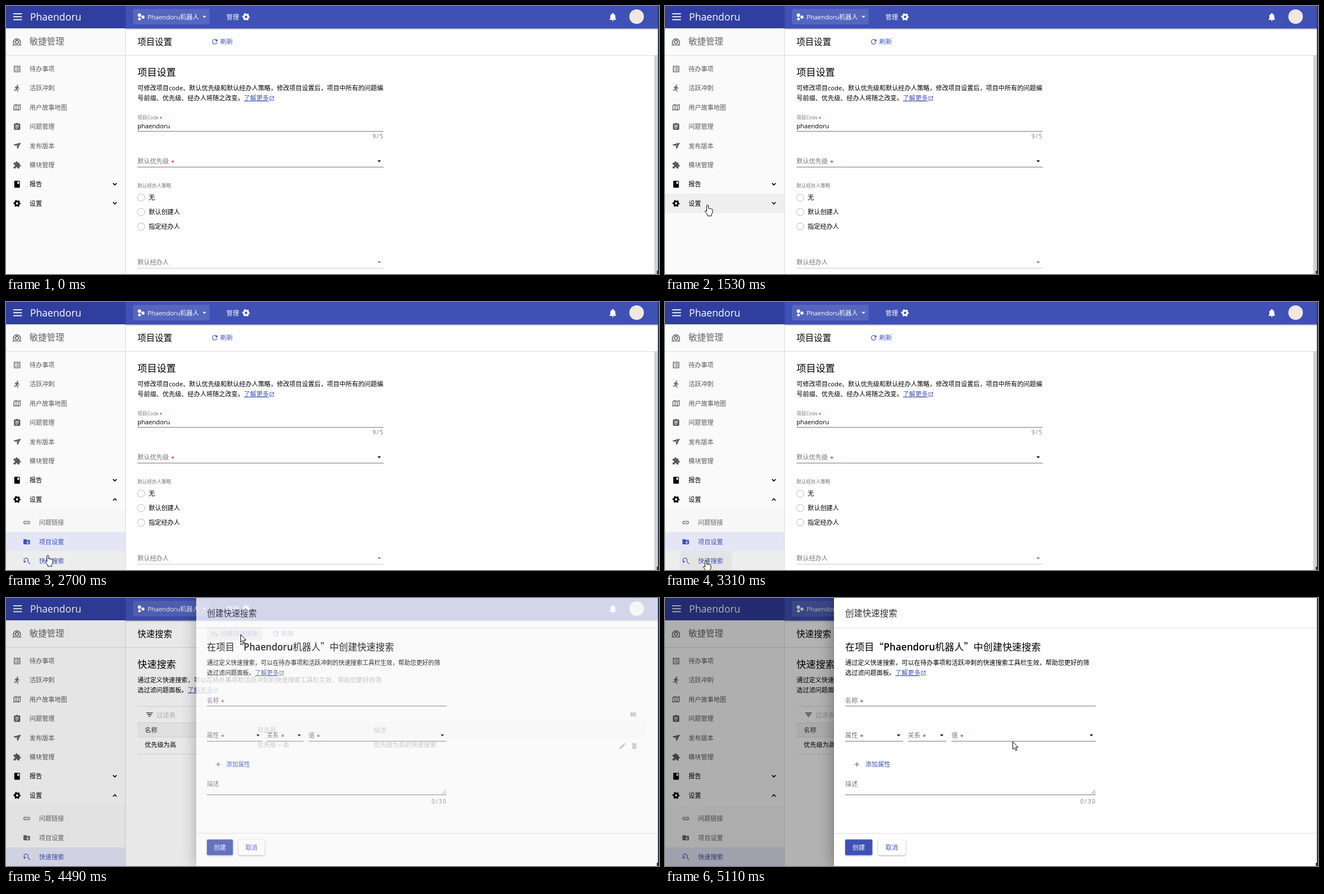
Write an HTML page that moves like this. It is 1167 by 480 pixels and loops after 5180 ms.

```html
<!DOCTYPE html>
<html lang="zh-CN">
<head>
<meta charset="utf-8">
<title>快速搜索</title>
<style>
html, body { margin: 0; width: 100%; height: 100%; overflow: hidden; background: #fff; }
svg { display: block; }
text { font-family: 'Open Sans', 'Noto Sans', 'Noto Sans CJK SC', 'Noto Sans CJK', sans-serif; white-space: pre; }
.cjk { font-family: 'Noto Sans CJK SC', 'Noto Sans CJK', sans-serif; }
.sub { color: #666; }
#drawer { transform-origin: 1165px 0; }
#panel { filter: drop-shadow(-4px 0 12px rgba(0,0,0,.3)); }
.button { filter: drop-shadow(0 1px 1.5px rgba(0,0,0,.35)); }
#ripple { transform-origin: 73px 17px; }
</style>
</head>
<body>
<svg id="stage" width="1167" height="480" viewBox="0 0 1167 480"></svg>
<script>
const LOOP = 5180;
const NAME = 'Phaendoru';
const BLUE = '#3f51b5', GREY = '#757575', RED = '#b71c1c', LINE = '#e0e0e0';

// Icons live on a 24 x 24 grid, either filled or stroked.
const FILLED = {
  run: 'M13.5 5.5a2 2 0 1 0 0-4 2 2 0 0 0 0 4zM9.9 19.4l1-4.4 2.1 2v6h2v-7.5l-2.1-2 .6-3c1.3 1.5 3.3 2.5 5.5 2.5v-2c-1.9 0-3.5-1-4.3-2.4l-1-1.6c-.6-.9-1.4-1.2-2.5-.9L6 8.3V13h2V9.6l1.8-.7-1.6 8.1-4.9-1-.4 2z',
  task: 'M19 3h-4.2a3 3 0 0 0-5.6 0H5a2 2 0 0 0-2 2v14a2 2 0 0 0 2 2h14a2 2 0 0 0 2-2V5a2 2 0 0 0-2-2zM14 17H7v-2h7zM17 13H7v-2h10zM17 9H7V7h10z',
  send: 'M1 8.5L23 3 13.5 22 11 13.5 17 8 8.5 12z',
  puzzle: 'M20.5 11H19V7a2 2 0 0 0-2-2h-4V3.5a2.5 2.5 0 0 0-5 0V5H4a2 2 0 0 0-2 2v3.8h1.5a2.7 2.7 0 0 1 0 5.4H2V20a2 2 0 0 0 2 2h3.8v-1.5a2.7 2.7 0 0 1 5.4 0V22H17a2 2 0 0 0 2-2v-4h1.5a2.5 2.5 0 0 0 0-5z',
  book: 'M18 2H6a2 2 0 0 0-2 2v16a2 2 0 0 0 2 2h12a2 2 0 0 0 2-2V4a2 2 0 0 0-2-2zM13 4h5v8l-2.5-1.5L13 12z',
  link: 'M3.9 12A3.1 3.1 0 0 1 7 8.9h4V7H7a5 5 0 0 0 0 10h4v-1.9H7A3.1 3.1 0 0 1 3.9 12zM8 13h8v-2H8zM17 7h-4v1.9h4a3.1 3.1 0 0 1 0 6.2h-4V17h4a5 5 0 0 0 0-10z',
  folder: 'M20 6h-8l-2-2H4a2 2 0 0 0-2 2v12a2 2 0 0 0 2 2h16a2 2 0 0 0 2-2V8a2 2 0 0 0-2-2zM15 9a2 2 0 1 1 0 4 2 2 0 0 1 0-4zM19 17h-8v-1c0-1.3 2.7-2 4-2s4 .7 4 2z',
  refresh: 'M17.65 6.35A8 8 0 1 0 19.73 14h-2.08A6 6 0 1 1 12 6c1.66 0 3.14.69 4.22 1.78L13 11h7V4z',
  bell: 'M12 22a2 2 0 0 0 2-2h-4a2 2 0 0 0 2 2zm6-6v-5c0-3.1-1.6-5.6-4.5-6.3V4a1.5 1.5 0 0 0-3 0v.7C7.6 5.4 6 7.9 6 11v5l-2 2v1h16v-1z',
  open: 'M19 19H5V5h7V3H5a2 2 0 0 0-2 2v14a2 2 0 0 0 2 2h14a2 2 0 0 0 2-2v-7h-2zM14 3v2h3.6l-9.8 9.8 1.4 1.4L19 6.4V10h2V3z',
  listAdd: 'M14 10H2v2h12zm0-4H2v2h12zm4 8v-4h-2v4h-4v2h4v4h2v-4h4v-2zM2 16h8v-2H2z',
  filter: 'M10 18h4v-2h-4zM3 6v2h18V6zm3 7h12v-2H6z',
  edit: 'M3 17.2V21h3.8L17.8 9.9l-3.7-3.7zM20.7 7a1 1 0 0 0 0-1.4l-2.3-2.3a1 1 0 0 0-1.4 0l-1.8 1.8 3.7 3.7z',
  trash: 'M6 19a2 2 0 0 0 2 2h8a2 2 0 0 0 2-2V7H6zM15.5 4l-1-1h-5l-1 1H5v2h14V4zM9 10.5l1-1 2 2 2-2 1 1-2 2 2 2-1 1-2-2-2 2-1-1 2-2z',
  columns: 'M3 5h5v14H3zM9.5 5h5v14h-5zM16 5h5v14h-5z',
  bubbles: 'M8 2a5 5 0 1 1 0 10A5 5 0 0 1 8 2zM18 8a4.5 4.5 0 1 1 0 9 4.5 4.5 0 0 1 0-9zM8 14a4 4 0 1 1 0 8 4 4 0 0 1 0-8z',
  caret: 'M6 9h12l-6 6z'
};
const STROKED = {
  list: 'M4 4h16v16H4zM7 8h2m2 0h6M7 12h2m2 0h6M7 16h2m2 0h6',
  map: 'M3 6l6-2 6 2 6-2v14l-6 2-6-2-6 2zM9 4v14M15 6v14',
  search: 'M7 15.5A6.5 6.5 0 1 1 15.5 13M3 15.5h4.5V11M15 13l7 8',
  agile: 'M1 21h22M5 20a9 9 0 1 1 14 0M12 9.5a4 4 0 1 1 0 8 4 4 0 0 1 0-8zM12 7v2.5M6.5 13.5H8M16 13.5h1.5',
  down: 'M6 9l6 6 6-6',
  up: 'M6 15l6-6 6 6',
  plus: 'M12 4v16M4 12h16'
};

function icon(name, cx, cy, size = 15.5, color = 'currentColor', weight = 2) {
  const place = `transform="translate(${cx - size / 2} ${cy - size / 2}) scale(${size / 24})"`;
  if (name === 'gear') {
    return `<g ${place} fill="none" stroke="${color}"><circle cx="12" cy="12" r="5.6" stroke-width="4.6"/>
      <circle cx="12" cy="12" r="8.4" stroke-width="3.4" stroke-dasharray="4.8 4" stroke-dashoffset="2.4"/></g>`;
  }
  return STROKED[name]
    ? `<path ${place} d="${STROKED[name]}" fill="none" stroke="${color}" stroke-width="${weight}"/>`
    : `<path ${place} d="${FILLED[name]}" fill="${color}" fill-rule="evenodd"/>`;
}
// Text is placed by its left edge and its vertical centre.
const text = (x, cy, str, fill = '#000', size = 11.2, attrs = '') =>
  `<text x="${x}" y="${cy + size * 0.37}" font-size="${size}" fill="${fill}" ${attrs}>${str}</text>`;
const rect = (x, y, w, h, fill, attrs = '') =>
  `<rect x="${x}" y="${y}" width="${w}" height="${h}" fill="${fill}" ${attrs}/>`;
const rule = (x1, x2, y, color = GREY, attrs = '') =>
  `<path d="M${x1} ${y}H${x2}" stroke="${color}" ${attrs}/>`;
const star = (x, cy, size = 11.2) => text(x, cy + 2, '*', RED, size);
const field = (x, cy, str) => text(x, cy, str, GREY) + star(x + str.length * 11.2 + 4, cy);
const select = (x, x2, cy, str) =>
  field(x, cy, str) + icon('caret', x2 - 8, cy, 13, '#000') + rule(x, x2, cy + 10.5);
const learnMore = (x, cy) =>
  text(x, cy, '了解更多', BLUE, 11.2, 'text-decoration="underline"') + icon('open', x + 50, cy + 1, 10.5, BLUE);
const counter = (x, cy, str) =>
  text(x + 1, cy, str, GREY, 10, 'text-anchor="end" letter-spacing="2"');
const intro = (x, cy) =>
  text(x, cy, '通过定义快速搜索，可以在待办事项和活跃冲刺的快速搜索工具栏生效，帮助您更好的筛') +
  text(x, cy + 17.5, '选过滤问题面板。') + learnMore(x + 89.6, cy + 17.5);
const heading = str => text(235, 64, str, '#000', 15.5) + text(235, 119, str, '#000', 17.2);

const header = ['#9aa0bf', '#d5d7e2', '#f0f0f3'].map((color, i) => rect(0, 40 + i, 1165, 1, color)).join('') +
  rect(0, 0, 1165, 40, BLUE) + rect(0, 0, 214, 40, '#303f9f') +
  [13, 18.3, 23.6].map(y => rect(13, y, 15.5, 1.8, '#fff')).join('') +
  text(43, 19.5, NAME, '#fff', 17.7) +
  rect(227, 5, 137, 28, '#5566be', 'rx="2"') + icon('bubbles', 241, 19.5, 15, '#fff') +
  text(253, 19.5, NAME + '机器人', '#fff') + icon('caret', 354.5, 19.5, 14, '#fff') +
  text(394, 19.5, '管理', '#fff') + icon('gear', 429, 19.5, 16, '#fff') +
  icon('bell', 1084.5, 19.5, 18, '#fff') + '<circle cx="1127" cy="19" r="13" fill="#efe8e0"/>';

const mainItems = [['list', '待办事项'], ['run', '活跃冲刺'], ['map', '用户故事地图'], ['task', '问题管理'],
  ['send', '发布版本'], ['puzzle', '模块管理'], ['book', '报告'], ['gear', '设置']];
const subItems = [['link', '问题链接'], ['folder', '项目设置'], ['search', '快速搜索']];

const sidebar = rect(0, 40, 213, 440, '#fafafa') +
  icon('agile', 19.5, 63.5, 17, '#555', 2) + text(42, 63, '敏捷管理', '#666', 15.5) +
  rect(0, 336, 213, 35, '#efefef', 'id="rowHover"') +
  mainItems.map(([glyph, str], i) => {
    const cy = 112.8 + 34.4 * i, color = i < 6 ? '#595959' : '#000';
    return icon(glyph, 19.8, cy, 15, color) + text(42, cy, str, color);
  }).join('') +
  icon('down', 194.5, 319, 13, '#000', 3) +
  `<g id="closed">${icon('down', 194.5, 353, 13, '#000', 3)}</g>` +
  `<g id="opened">${icon('up', 194.5, 354, 13, '#000', 3)}</g>` +
  rect(0, 371, 213, 109, '#f7f7f7') +
  subItems.map(([glyph, str], i) => {
    const cy = 395 + 34.4 * i;
    return `<g class="sub" id="sub${i}">${rect(0, cy - 17.2, 213, 34.4, 'transparent', 'class="bg"')}` +
      (i === 2 ? '<svg y="446" width="213" height="34"><circle id="ripple" cx="73" cy="17" r="47" fill="#000" fill-opacity=".035"/></svg>' : '') +
      icon(glyph, 37, cy, 14) + text(59, cy, str, 'currentColor') + '</g>';
  }).join('') +
  rect(0, 371, 213, 110, '#fafafa', 'id="cover"') +
  rect(213, 40, 1, 440, '#d8d8d8') + rule(0, 1165, 88.5, '#dcdcdc');

const settingsPage = heading('项目设置') +
  icon('refresh', 373, 64, 14.5, BLUE) + text(383, 64, '刷新', BLUE) +
  text(235, 147, '可修改项目code、默认优先级和默认经办人策略，修改项目设置后，项目中所有的问题编') +
  text(235, 164.5, '号前缀、优先级、经办人将随之改变。') + learnMore(425, 164.5) +
  text(235, 200, '项目Code', GREY, 8.6) + star(274.5, 200, 8.6) +
  text(235, 215, NAME.toLowerCase()) + rule(235, 675, 224.5) + counter(675, 233, '9/5') +
  select(235, 675, 278, '默认优先级') +
  text(235, 322, '默认经办人策略', GREY, 8.6) +
  ['无', '默认创建人', '指定经办人'].map((str, i) => {
    const cy = 343 + 26 * i;
    return `<circle cx="241.5" cy="${cy}" r="6.5" fill="#fff" stroke="#b5b5b5"/>` + text(255, cy, str);
  }).join('') +
  text(235, 458.5, '默认经办人', GREY) + icon('caret', 667, 459, 13, GREY) +
  rule(235, 675, 469.5, '#999', 'stroke-dasharray="1 1"') +
  rect(1158.5, 88, 6, 392, '#d2d2d2');

const searchPage = heading('快速搜索') +
  rect(359, 52, 100, 24, 'transparent', 'id="buttonHover" rx="2"') +
  icon('listAdd', 373, 64, 15.5, BLUE) + text(383, 64, '创建快速搜索', BLUE) +
  icon('refresh', 482, 64, 14.5, BLUE) + text(492, 64, '刷新', BLUE) +
  intro(235, 147) +
  rule(235, 1144, 194, LINE) + icon('filter', 256.5, 209, 15.5, '#222') + text(269, 209.5, '过滤表', '#bdbdbd') +
  rect(1096.5, 198, 1, 21, LINE) + icon('columns', 1121, 208.5, 13, '#000') +
  rect(235, 223, 909, 26, '#f5f5f5') + [223.5, 249, 279.5].map(y => rule(235, 1144, y, LINE)).join('') +
  [[248, '名称', '优先级为高'], [449, '筛选器', '优先级 = 高'], [657, '描述', '优先级为高的快速搜索']]
    .map(([x, head, cell]) => text(x, 237, head, '#333') + text(x, 263, cell)).join('') +
  icon('edit', 1102, 265, 14.5, '#000') + icon('trash', 1123, 265, 14, '#000');

const drawer = rect(302, 0, 863, 480, '#fff', 'id="panel"') +
  text(322, 27, '创建快速搜索', '#333', 15.5) + rule(302, 1165, 53.5, LINE) +
  text(322, 88, `在项目<tspan class="cjk">“</tspan><tspan font-weight="600">${NAME}</tspan>机器人<tspan class="cjk">”</tspan>中创建快速搜索`, '#000', 17.2) +
  intro(322, 116) +
  field(322, 183.5, '名称') + rule(322, 770, 193.5) +
  select(322, 425.5, 246, '属性') + select(434, 502.5, 246, '关系') + select(512, 770, 246, '值') +
  icon('plus', 343, 298, 13, BLUE) + text(358, 298, '添加属性', BLUE) +
  text(322, 333, '描述', GREY) + rule(322, 770, 352.5) +
  '<path d="M762 351l7-7M766 351l3-3" stroke="#777"/>' + counter(770, 364, '0/30') +
  rule(302, 1165, 421.5, LINE) +
  rect(322, 432.5, 48.5, 28, BLUE, 'rx="2" class="button"') + text(335, 447, '创建', '#fff') +
  rect(381, 432.5, 49, 28, '#fff', 'rx="2" class="button"') + text(394, 447, '取消', BLUE);

const windowEdge = rect(1165, 0, 2, 480, '#26384c') + rect(1163, 474, 4, 6, '#333', 'rx="1"');

const cursor = `<g stroke="#000" stroke-linejoin="round" fill="#fff">
  <path id="arrow" d="M.5 .5V14L3.6 11.2 5.8 16.2 8 15.2 5.8 10.4H10z"/>
  <path id="hand" d="M-1.5 12V2a1.6 1.6 0 0 1 3.2 0V7a1.4 1.4 0 0 1 2.6 .4 1.4 1.4 0 0 1 2.5 .6 1.3 1.3 0 0 1 2.2 1V14L7 17.5V20H0V18L-4.4 12.2C-5 10.5-3.2 9.8-1.5 12z"/></g>`;

document.getElementById('stage').innerHTML =
  rect(0, 0, 1167, 480, '#fefefe') + header + sidebar +
  `<g id="settings">${settingsPage}</g><g id="search">${searchPage}</g>` +
  rect(0, 0, 1165, 480, '#000', 'id="mask"') + `<g id="drawer">${drawer}</g>` +
  windowEdge + `<g id="cursor">${cursor}</g>`;

// Keyframes are written in milliseconds and hold their value unless a frame names its own easing.
let css = '', count = 0;
function animate(selector, frames) {
  const id = 'k' + count++;
  const body = frames.map(([ms, style]) => `${(ms / LOOP * 100).toFixed(3)}%{${style}}`).join('');
  css += `@keyframes ${id}{${body}}${selector}{animation:${id} ${LOOP}ms step-end infinite}`;
}
function showDuring(selector, ...spans) {
  const frames = spans.flatMap(([from, to]) => [[from, 'opacity:1'], [to, 'opacity:0']]);
  if (spans[0][0] > 0) frames.unshift([0, 'opacity:0']);
  animate(selector, frames.filter(([ms]) => ms < LOOP));
}

const SWITCH = 3540;
showDuring('#settings', [0, SWITCH]);
showDuring('#search', [SWITCH, LOOP]);
showDuring('#rowHover', [1220, 2150]);
showDuring('#closed', [0, 1690]);
showDuring('#opened', [1690, LOOP]);
showDuring('#hand', [1220, SWITCH], [3880, 4410]);
showDuring('#arrow', [300, 1220], [SWITCH, 3880], [4410, LOOP]);

animate('#cover', [
  [0, 'transform:none'],
  [1690, 'transform:none;animation-timing-function:ease-in-out'],
  [1940, 'transform:translateY(110px)']]);
animate('#sub0', [[0, 'color:#666'], [2190, `color:${BLUE}`], [2400, 'color:#666']]);
animate('#sub0 .bg', [[0, 'fill:transparent'], [2190, 'fill:#ededed'], [2400, 'fill:transparent']]);
animate('#sub1', [[0, `color:${BLUE}`], [SWITCH, 'color:#666']]);
animate('#sub1 .bg', [[0, 'fill:#e4e6f6'], [SWITCH, 'fill:transparent']]);
animate('#sub2', [[0, 'color:#666'], [2620, `color:${BLUE}`]]);
animate('#sub2 .bg', [[0, 'fill:transparent'], [2620, 'fill:#ededed'], [SWITCH, 'fill:#e4e6f6']]);
animate('#ripple', [[0, 'transform:scale(0)'], [3160, 'transform:scale(.4)'], [3240, 'transform:scale(.75)'],
  [3310, 'transform:scale(1)'], [3400, 'transform:scale(1.3)'], [SWITCH, 'transform:scale(0)']]);
animate('#buttonHover', [[0, 'fill:transparent'], [4010, 'fill:#f3f3f3'], [4330, 'fill:#d5d6dc']]);
animate('#mask', [[0, 'opacity:0'], [4490, 'opacity:.085'], [4580, 'opacity:.17'], [4640, 'opacity:.23'], [4720, 'opacity:.3']]);

const drawerAt = p => `opacity:${p};transform:scaleX(${0.8 + 0.2 * p})`;
animate('#drawer', [[0, drawerAt(0)], [4490, drawerAt(0.78)], [4580, drawerAt(0.96)], [4640, drawerAt(1)]]);

// [ms, x, y, number of jumps on the way to the next point]
const path = [
  [0, 939, 500], [300, 939, 468, 6], [760, 214, 430], [830, 196, 424, 2], [990, 125, 396, 4], [1300, 80, 361],
  [1380, 76, 356], [1610, 76, 356, 5], [2020, 82, 359], [2070, 82, 359, 6], [2540, 78, 434, 3], [2760, 73, 463],
  [3460, 73, 463, 6], [3960, 422, 68, 2], [4170, 420, 66], [4330, 419, 65], [4790, 419, 65, 2], [4960, 567, 163, 2], [5110, 621, 257]];
animate('#cursor', path.map(([ms, x, y, jumps]) =>
  [ms, `transform:translate(${x}px,${y}px)` + (jumps ? `;animation-timing-function:steps(${jumps})` : '')]));

const sheet = document.createElement('style');
sheet.textContent = css;
document.head.append(sheet);
</script>
</body>
</html>
```
